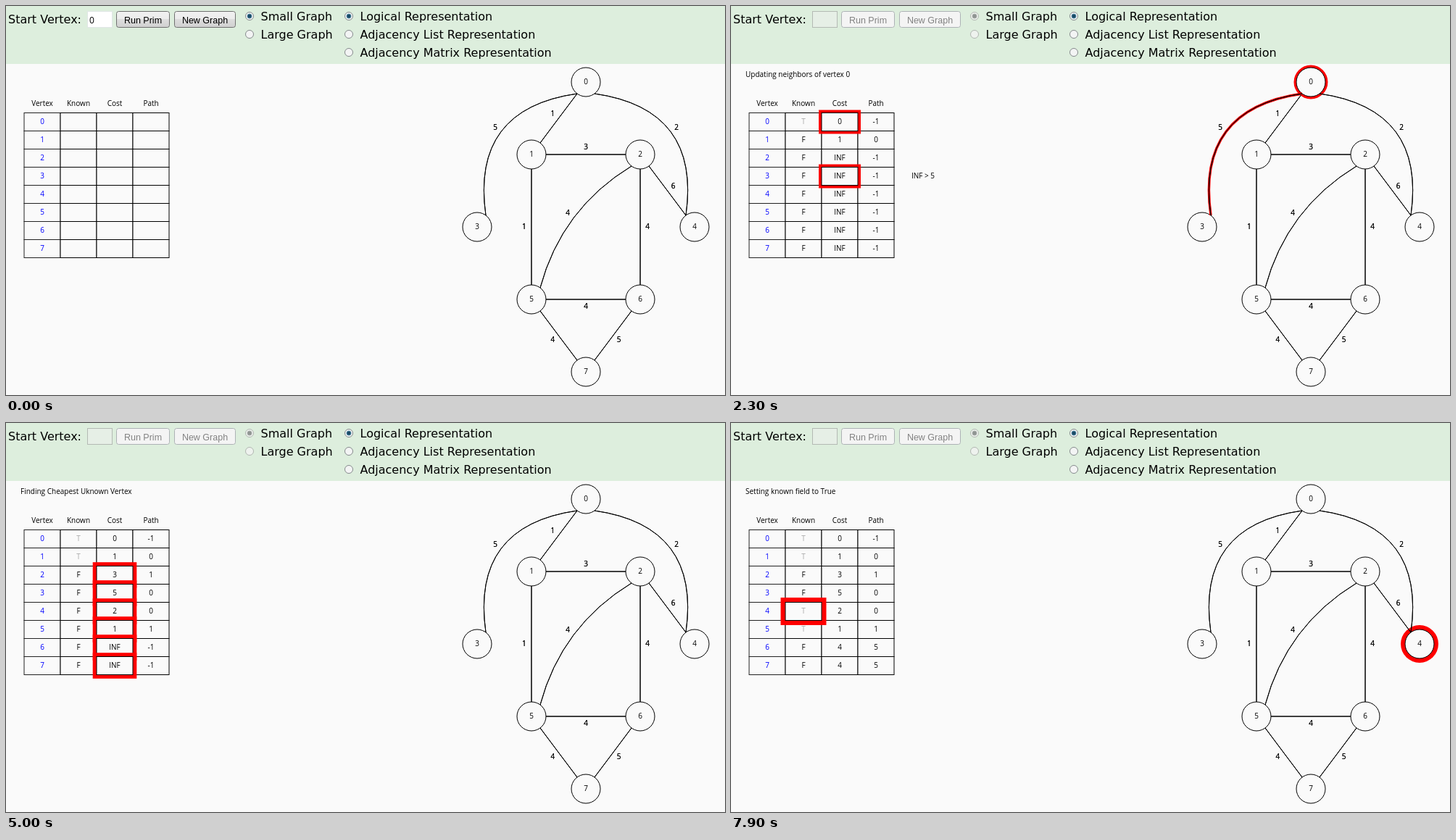
These frames come from a looping animation (992 by 537 pixels, 8 s). An HTML page with a canvas:

```html
<!DOCTYPE html>
<html>
<head>
<meta charset="utf-8">
<style>
  html, body { margin: 0; height: 100%; overflow: hidden; background: #fafafa; }
  canvas { display: block; }
</style>
</head>
<body>
<canvas id="stage" width="992" height="537"></canvas>
<script>
const ctx = document.getElementById('stage').getContext('2d');
const SMALL = '10px "Open Sans", "Noto Sans", sans-serif';
const LARGE = '16px "DejaVu Sans", sans-serif';
const BUTTON = '12.5px "Liberation Sans", sans-serif';
const PAPER = '#fafafa', LOOP = 8000;

const nodes = [[800, 105], [725, 205], [875, 205], [650, 305], [950, 305], [725, 405], [875, 405], [800, 505]];
// from, to, weight, curvature (its sign also picks the label side)
const edges = [
  [0, 1, 1, .001], [0, 3, 5, .5], [0, 4, 2, -.5], [1, 2, 3, -.001], [1, 5, 1, .001], [2, 4, 6, -.001],
  [2, 5, 4, .2], [2, 6, 4, -.001], [5, 6, 4, .001], [5, 7, 4, .001], [6, 7, 5, -.001]
];
// start of every step, in tenths of a second
const starts = [7, 10, 14, 17, 21, 24, 28, 31, 35, 38, 41, 44, 47, 51, 54, 57, 60, 64, 67, 71, 74, 77];
// highlight pulse: time in tenths, cycles completed
const pulseKeys = [[7, -.36], [15, -.04], [23, .44], [33, 1.025], [46, 2], [50, 2.275], [67, 3.59], [79, 4.13]];

const KNOWN = 1, COST = 2;
const steps = runPrim();

function runPrim() {
  const list = [], ids = nodes.map((_, i) => i);
  const known = ids.map(() => false), cost = ids.map(() => Infinity), path = ids.map(() => -1);
  const add = (message, cells, node, edge, note) =>
    list.push({ message, cells, node, edge, note, known: [...known], cost: [...cost], path: [...path] });
  cost[0] = 0;
  while (list.length < starts.length) {
    const open = ids.filter(i => !known[i]);
    add('Finding Cheapest Uknown Vertex', open.map(i => [i, COST]));
    const v = open.reduce((a, b) => cost[b] < cost[a] ? b : a);
    add('Cheapest Unknown Vertex: ' + v, [[v, COST]], v);
    known[v] = true;
    add('Setting known field to True', [[v, KNOWN]], v);
    const around = edges.filter(e => e[0] === v || e[1] === v)
      .map(e => [e[0] === v ? e[1] : e[0], e]).sort((a, b) => a[0] - b[0]);
    for (const [n, edge] of around) {
      const message = 'Updating neighbors of vertex ' + v, weight = edge[2];
      if (known[n]) {
        add(message, [[n, KNOWN]], v, edge, { text: `Vertex ${n} known`, x: 300, row: n });
        continue;
      }
      const closer = cost[n] > weight;
      const text = `${costText(cost[n])} ${closer ? '>' : '<'} ${weight}`;
      add(message, [[v, COST], [n, COST]], v, edge, { text, x: 265, row: n });
      if (closer) { cost[n] = weight; path[n] = v; }
    }
  }
  return list;
}

function costText(c) { return c === Infinity ? 'INF' : String(c); }

function text(s, x, y, color = '#000', font = SMALL, align = 'center') {
  ctx.font = font;
  ctx.textAlign = align;
  ctx.fillStyle = color;
  ctx.fillText(s, x, y);
}

function disc(x, y, r, fill, stroke) {
  ctx.beginPath();
  ctx.arc(x, y, r, 0, 2 * Math.PI);
  ctx.fillStyle = fill;
  ctx.fill();
  if (stroke) { ctx.strokeStyle = stroke; ctx.stroke(); }
}

function pulse(t) {
  let i = 1;
  while (i < pulseKeys.length - 1 && t > pulseKeys[i][0]) i++;
  const [t0, a] = pulseKeys[i - 1], [t1, b] = pulseKeys[i];
  const cycles = a + (b - a) * (t - t0) / (t1 - t0);
  return 7 - 8 * Math.abs(cycles - Math.round(cycles));
}

function drawCell(row, col, step, glow) {
  const x = 25 + 50 * col, y = 147.5 + 25 * row;
  if (glow) {
    const g = glow + .5;
    ctx.fillStyle = '#f00';
    ctx.fillRect(x - g, y - g, 50 + 2 * g, 25 + 2 * g);
  }
  ctx.fillStyle = PAPER;
  ctx.fillRect(x, y, 50, 25);
  ctx.strokeStyle = col ? '#000' : '#222';
  ctx.strokeRect(x, y, 50, 25);
  if (col && !step) return;
  const isKnown = step && step.known[row];
  const value = col === 0 ? row : col === KNOWN ? (isKnown ? 'T' : 'F')
    : col === COST ? costText(step.cost[row]) : step.path[row];
  text(value, x + 25, y + 15.5, col === 0 ? '#00f' : col === KNOWN && isKnown ? '#aaa' : '#000');
}

function drawTable(step, glow) {
  ['Vertex', 'Known', 'Cost', 'Path'].forEach((s, i) => text(s, 50 + 50 * i, 138));
  for (let row = 0; row < nodes.length; row++)
    for (let col = 0; col < 4; col++) drawCell(row, col, step);
  if (!step) return;
  const cells = [...step.cells].sort((a, b) => a[0] - b[0]);
  for (const [row, col] of cells) drawCell(row, col, step, glow);
  text(step.message, 20, 98, '#000', SMALL, 'left');
  if (step.note) text(step.note.text, step.note.x, 163 + 25 * step.note.row);
}

function drawNode(i, glow) {
  const [x, y] = nodes[i];
  if (glow) disc(x, y, 20 + glow, '#f00');
  disc(x, y, 20, PAPER, '#000');
  text(i, x, y + 3);
}

function drawEdge([from, to, weight, curve], glow) {
  const [ax, ay] = nodes[from], [bx, by] = nodes[to];
  const len = Math.hypot(bx - ax, by - ay), ux = (bx - ax) / len, uy = (by - ay) / len;
  const span = len - 40, midX = (ax + bx) / 2, midY = (ay + by) / 2;
  const bend = curve * span, labelShift = bend / 2 + 10 * Math.sign(curve);
  ctx.beginPath();
  ctx.moveTo(ax + 20 * ux, ay + 20 * uy);
  ctx.quadraticCurveTo(midX - uy * bend, midY + ux * bend, bx - 20 * ux, by - 20 * uy);
  if (glow) {
    ctx.lineWidth = glow;
    ctx.strokeStyle = '#f00';
    ctx.stroke();
    ctx.lineWidth = 1;
  }
  ctx.strokeStyle = '#000';
  // both directions share the same line and label
  for (let i = 0; i < 2; i++) {
    ctx.stroke();
    text(weight, midX - uy * labelShift, midY + ux * labelShift + 3);
  }
}

function drawGraph(step, glow) {
  const hot = step ? step.node : undefined;
  nodes.forEach((_, i) => { if (i !== hot) drawNode(i); });
  if (hot !== undefined) drawNode(hot, glow);
  for (const e of edges) drawEdge(e, step && step.edge === e ? glow : 0);
}

function button(label, x, w, state) {
  const fill = ctx.createLinearGradient(0, 7, 0, 30);
  const colors = {
    normal: ['#f2f2f2', '#ebebeb', '#dddddd', '#cfcfcf'],
    hover: ['#eaf6fd', '#d9f0fc', '#bee6fd', '#a7d9f5'],
    disabled: ['#f4f4f4', '#f4f4f4', '#f4f4f4', '#f4f4f4']
  }[state];
  [0, .5, .5, 1].forEach((p, i) => fill.addColorStop(p, colors[i]));
  ctx.beginPath();
  ctx.roundRect(x + .5, 7.5, w - 1, 22, 3);
  ctx.fillStyle = fill;
  ctx.fill();
  ctx.strokeStyle = { normal: '#707070', hover: '#3c7fb1', disabled: '#adb2b5' }[state];
  ctx.stroke();
  text(label, x + w / 2, 24, state === 'disabled' ? '#838383' : '#000', BUTTON);
}

function radio(label, x, y, checked, disabled) {
  disc(x, y, 5.5, disabled ? '#eef2ee' : '#f3f4f4', disabled ? '#b1b7b1' : '#858a8c');
  if (checked) disc(x, y, 3, disabled ? '#8f9492' : '#1b4a66', disabled ? '#a5aaa7' : '#4d87a3');
  text(label, x + 15.5, y + 6, '#000', LARGE, 'left');
}

function drawControls(busy, hover) {
  ctx.fillStyle = '#dde';
  ctx.fillStyle = '#ddeedd';
  ctx.fillRect(0, 0, 992, 80);
  text('Start Vertex:', 3, 24, '#000', LARGE, 'left');
  ctx.fillStyle = busy ? '#e6efe6' : '#fff';
  ctx.fillRect(112, 7, 35, 23);
  ctx.strokeStyle = busy ? '#b4bab4' : '#e0e6e6';
  ctx.strokeRect(112.5, 7.5, 34, 22);
  if (!busy) text('0', 115, 24, '#000', '12px "Open Sans", sans-serif', 'left');
  button('Run Prim', 152, 74, busy ? 'disabled' : hover ? 'hover' : 'normal');
  button('New Graph', 232, 85, busy ? 'disabled' : 'normal');
  radio('Small Graph', 336, 14, true, busy);
  radio('Large Graph', 336, 39, false, busy);
  radio('Logical Representation', 473, 14, true);
  radio('Adjacency List Representation', 473, 39);
  radio('Adjacency Matrix Representation', 473, 64);
}

function draw(now) {
  const t = Math.floor(now % LOOP / 100);
  const step = steps[starts.filter(s => s <= t).length - 1];
  const glow = pulse(t);
  ctx.lineWidth = 1;
  ctx.fillStyle = PAPER;
  ctx.fillRect(0, 0, 992, 537);
  drawTable(step, glow);
  drawGraph(step, glow);
  drawControls(!!step, t >= 5);
}

const begin = performance.now();
function tick() {
  draw(performance.now() - begin);
  requestAnimationFrame(tick);
}
tick();
</script>
</body>
</html>
```
